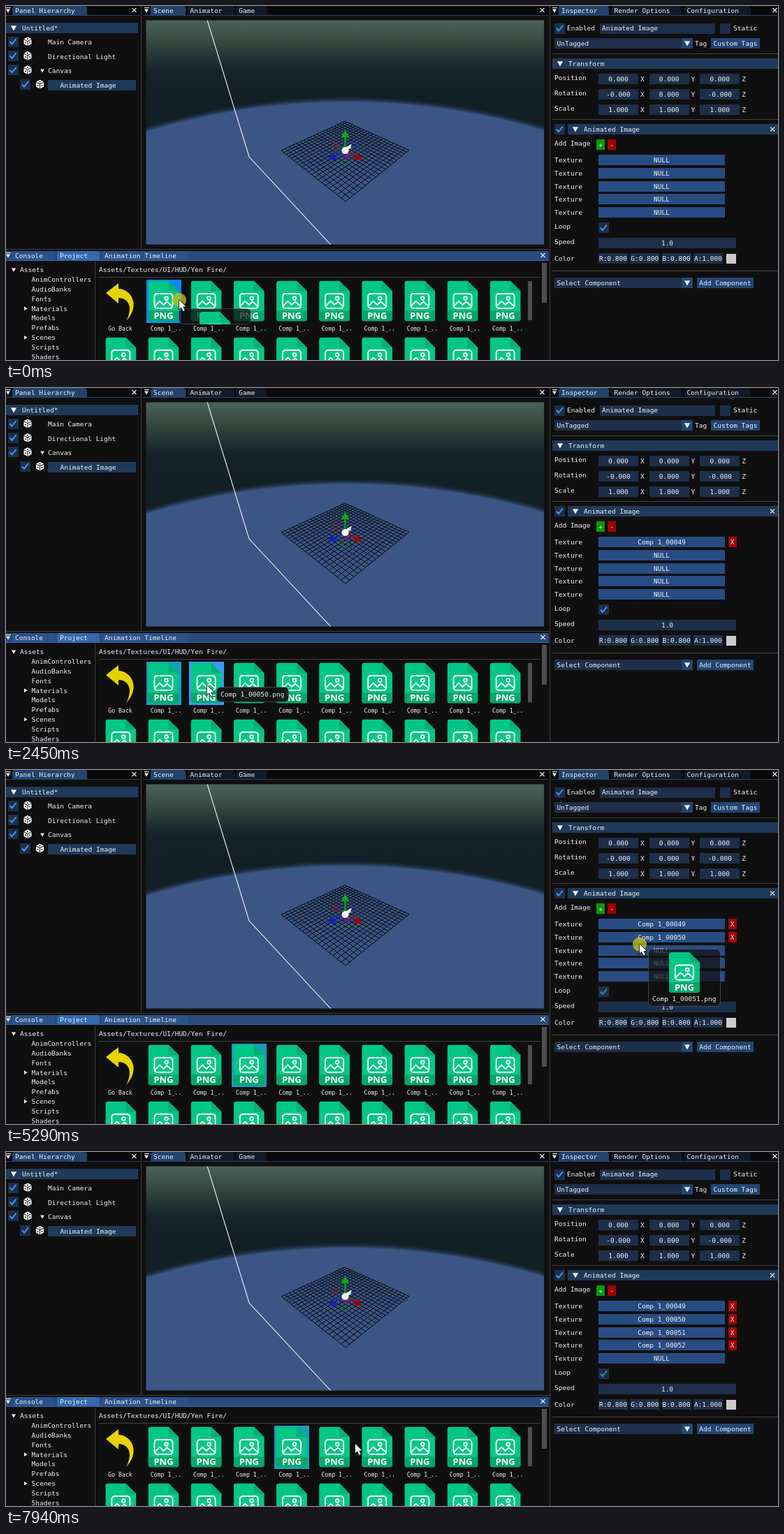
These frames come from a looping animation (1105 px wide and 507 px high, 8 s). An HTML page with a canvas:

```html
<!DOCTYPE html>
<html lang="en">
<head>
<meta charset="utf-8">
<title>Animated image editor</title>
<style>
html, body { margin: 0; width: 100%; height: 100%; overflow: hidden; background: #0f0f0f; }
canvas { display: block; }
</style>
</head>
<body>
<canvas id="stage" width="1105" height="507"></canvas>
<script>
const W = 1105, H = 507, LOOP = 8000, TICK = 80, LAG = 16, CHAR = 5.72;
const stage = document.getElementById('stage').getContext('2d');
let g = stage;

const C = {
  bg: '#0f0f0f', frame: '#1d2f49', button: '#234572', header: '#1f3a59', line: '#3e3e48',
  check: '#4296fa', slot: '#284c82', red: '#a00000', green: '#0a9a0a', text: '#f2f2f2',
  selected: '#189cbc', hover: '#4296fa', active: '#0f87fa'
};
const BAR = { bar: '#0a0a0a', tab: '#111a26', on: '#23436c' };
const FOCUSED_BAR = { bar: '#294a7a', tab: '#2b5288', on: '#3369ad' };

// ---------- drawing helpers ----------
function box(x, y, w, h, color) {
  g.fillStyle = color;
  g.fillRect(Math.round(x), Math.round(y), w, h);
}
function trace(points) {
  g.beginPath();
  points.forEach(([x, y]) => g.lineTo(x, y));
}
function poly(points, color) {
  trace(points);
  g.fillStyle = color;
  g.fill();
}
function stroke(points, color, width = 1) {
  trace(points);
  g.strokeStyle = color;
  g.lineWidth = width;
  g.stroke();
}
function dot(x, y, r, color) {
  g.beginPath();
  g.arc(x, y, r, 0, 7);
  g.fillStyle = color;
  g.fill();
}
function outline(x, y, w, h, color, width) {
  g.strokeStyle = color;
  g.lineWidth = width;
  g.strokeRect(x, y, w, h);
}
// y is the middle of the capital letters
function text(s, x, y, align = 'left', size = 9.5) {
  g.font = size + 'px "DejaVu Sans Mono", monospace';
  g.textAlign = align;
  g.fillStyle = C.text;
  g.fillText(s, x, y + size * 0.36);
}
function field(s, x, y, w, color = C.frame) {
  box(x, y - 7.5, w, 15, color);
  text(s, x + w / 2, y + 0.5, 'center');
}
// triangle of radius r; angle 0 points right
function arrow(x, y, r, angle, color) {
  const corner = k => [x + r * Math.cos(angle + k * 2.1), y + r * Math.sin(angle + k * 2.1)];
  poly([0, 1, 2].map(corner), color);
}
function down(x, y, r = 4.8) {
  arrow(x, y - 0.8, r, Math.PI / 2, C.text);
}
function cross(x, y) {
  for (const s of [-3, 3]) stroke([[x - 3, y - s], [x + 3, y + s]], C.text, 1.1);
}
function checkbox(x, y, color) {
  box(x, y - 7.5, 15, 15, C.frame);
  if (color) stroke([[x + 3, y], [x + 6, y + 3.5], [x + 12, y - 4]], color, 2);
}
function header(s, x, y, w) {
  box(x, y - 7.5, w, 15, C.header);
  down(x + 11, y);
  text(s, x + 23, y + 0.5);
}
function combo(s, y) {
  field('', 785, y, 183);
  field('', 967, y, 16, C.button);
  down(975, y);
  text(s, 788.5, y);
}
function cube(x, y) {
  poly([[x, y - 6], [x + 5.5, y - 3.2], [x, y - 0.6], [x - 5.5, y - 3.2]], '#fff');
  for (const s of [-1, 1]) {
    poly([[x + s * 5.5, y - 2.3], [x + s * 0.5, y + 0.3], [x + s * 0.5, y + 6.5],
      [x + s * 5.5, y + 3.8]], '#fff');
    dot(x + s * 3, y + 2, 1, C.bg);
  }
  dot(x, y - 3.2, 1, C.bg);
}
function fileIcon(x, y) {
  g.save();
  g.translate(x, y);
  g.beginPath();
  g.roundRect(0, 0, 44, 58, 4);
  g.clip();
  poly([[0, 0], [29, 0], [44, 15], [44, 58], [0, 58]], '#00c785');
  poly([[0, 43], [44, 43], [44, 58], [0, 58]], '#00a76c');
  poly([[29, 0], [44, 15], [29, 15]], '#00b076');
  g.beginPath();
  g.roundRect(9, 18.5, 26, 21, 4);
  g.moveTo(28.4, 25);
  g.arc(26, 25, 2.4, 0, 7);
  g.strokeStyle = '#fff';
  g.lineWidth = 1.8;
  g.stroke();
  stroke([[9, 37], [16.5, 29], [22, 34.5], [27, 30], [34.5, 36.5]], '#fff', 1.8);
  g.font = 'bold 13px "Open Sans", sans-serif';
  g.textAlign = 'center';
  g.fillStyle = '#fff';
  g.fillText('PNG', 22, 54.5);
  g.restore();
}

// ---------- still parts ----------
function tabs(x0, x1, y, names, on, colors) {
  box(x0, y - 6, x1 - x0, 13, colors.bar);
  box(x0, y + 7, x1 - x0, 1, colors.on);
  let x = x0 + 15;
  names.forEach((s, i) => {
    const w = s.length * CHAR;
    g.beginPath();
    g.roundRect(Math.round(x - 4), y - 6, Math.round(w + 21), 13, [4, 4, 0, 0]);
    g.fillStyle = i === on ? colors.on : colors.tab;
    g.fill();
    text(s, x, y + 0.5);
    x += w + 24;
  });
  box(x0 + 2, y - 4, 7, 1, C.text);
  down(x0 + 5, y + 1, 3.5);
  cross(x1 - 8.5, y);
}

function hierarchy() {
  tabs(-2, 192, 6, ['Panel Hierarchy'], 0, BAR);
  header('Untitled*', 0, 31.5, 189);
  box(60, 105.5, 126, 15, C.header);
  ['Main Camera', 'Directional Light', 'Canvas', 'Animated Image'].forEach((s, i) => {
    const y = 51 + i * 20.4, indent = i === 3 ? 17.5 : 0;
    checkbox(2.5 + indent, y, C.check);
    cube(31 + indent, y - 0.5);
    text(s, 60 + indent, y + 1);
  });
  down(52, 93, 3.3);
}

// maps the unit square onto four corners in perspective
function projector([[x0, y0], [x1, y1], [x2, y2], [x3, y3]]) {
  const sx = x0 - x1 + x2 - x3, sy = y0 - y1 + y2 - y3;
  const ax = x1 - x2, ay = y1 - y2, bx = x3 - x2, by = y3 - y2;
  const det = ax * by - bx * ay;
  const p = (sx * by - bx * sy) / det, q = (ax * sy - sx * ay) / det;
  return (u, v) => {
    const d = 1 + p * u + q * v;
    return [
      (x0 + (x1 - x0 + p * x1) * u + (x3 - x0 + q * x3) * v) / d,
      (y0 + (y1 - y0 + p * y1) * u + (y3 - y0 + q * y3) * v) / d
    ];
  };
}

function gizmo(x, y) {
  const axis = (angle, length, color) => {
    const dx = Math.cos(angle), dy = Math.sin(angle);
    stroke([[x, y], [x + dx * length, y + dy * length]], color, 2.2);
    arrow(x + dx * length, y + dy * length, 7, angle, color);
  };
  outline(x - 17, y - 11, 6, 7, '#a01018', 1);
  outline(x + 10, y - 11, 6, 7, '#1c2ca0', 1);
  stroke([[x - 7, y + 17], [x, y + 13], [x + 7, y + 17], [x, y + 22], [x - 7, y + 17]], '#0a8a30');
  poly([[x, y + 6], [x + 7, y + 9], [x + 2, y + 13], [x - 4, y + 9]], '#6a1a90');
  axis(-Math.PI / 2, 22, '#08a818');
  axis(0.5, 21, '#960a10');
  axis(Math.PI - 0.5, 21, '#1420b0');
  poly([[x + 2, y - 5], [x + 9, y - 9], [x + 8, y - 3], [x + 3, y]], '#e8e8e8');
  dot(x, y + 0.5, 5, '#fff');
}

function gradient(grad, ...stops) {
  stops.forEach(([at, color]) => grad.addColorStop(at, color));
  return grad;
}

function scene() {
  tabs(196, 776, 6, ['Scene', 'Animator', 'Game'], 0, BAR);
  g.save();
  g.beginPath();
  g.rect(200.5, 20.5, 569.5, 321);
  g.clip();
  box(200, 20, 571, 322, gradient(g.createLinearGradient(0, 20, 0, 130),
    [0, '#4a645a'], [0.3, '#32483f'], [0.65, '#16242a'], [1, '#121f25']));
  const r = 990, cx = 488, cy = 134 + r;
  dot(cx, cy, r + 5, gradient(g.createRadialGradient(cx, cy, r - 4, cx, cy, r + 5),
    [0, '#3b5685'], [1, 'rgba(24,40,54,0)']));

  const at = projector([[485, 165], [577, 206.5], [486, 280], [394, 207]]);
  for (let i = 0; i <= 20; i++) {
    const k = i / 20;
    stroke([at(k, 0), at(k, 1)], '#05080d');
    stroke([at(0, k), at(1, k)], '#05080d');
  }
  stroke([[288, 20], [348, 216], [465, 342]], '#f0f2f5', 1.1);
  gizmo(485.5, 206.5);
  g.restore();
}

const rowY = i => Math.round(220 + i * 18.75) + 0.5;

function inspector() {
  tabs(780, 1109, 6, ['Inspector', 'Render Options', 'Configuration'], 0, BAR);
  checkbox(785, 32, C.check);
  text('Enabled', 803, 32);
  field('', 850, 32, 165);
  text('Animated Image', 853, 32);
  checkbox(1022, 32);
  text('Static', 1041, 32);
  combo('UnTagged', 53.5);
  text('Tag', 986, 54);
  field('Custom Tags', 1009, 53.5, 70, C.button);

  for (const y of [68, 162, 379]) box(782, y, 323, 1, C.line);
  header('Transform', 782, 82.5, 323);
  ['Position', 'Rotation', 'Scale'].forEach((s, row) => {
    const y = 104 + row * 22;
    text(s, 785, y - 1.5);
    for (let i = 0; i < 3; i++) {
      const x = 848 + i * 72.6, sign = row === 1 && i !== 1 ? '-' : '';
      field(sign + (row === 2 ? '1.000' : '0.000'), x, y, 57);
      text('XYZ'[i], x + 60, y + 0.5);
    }
  });

  checkbox(785, 176.5, C.check);
  header('Animated Image', 804, 176.5, 301);
  cross(1097, 176.5);
  text('Add Image', 785, 197);
  field('+', 845, 198.5, 12, C.green);
  field('-', 861, 198.5, 12, C.red);
  for (let i = 0; i < 5; i++) text('Texture', 785, rowY(i));
  text('Loop', 785, 316);
  text('Speed', 785, 338);
  field('1.0', 848, 339.5, 197);
  text('Color', 785, 361.5);
  ['R:0.800', 'G:0.800', 'B:0.800', 'A:1.000'].forEach((s, i) => field(s, 848 + i * 45.3, 361.5, 42));
  box(1031, 354.5, 14, 14, '#cccccc');
  combo('Select Component', 396.5);
  field('Add Component', 989, 396.5, 81, C.button);
}

function backArrow() {
  g.beginPath();
  g.moveTo(143, 411);
  g.lineTo(161, 397);
  g.lineTo(161, 405);
  g.bezierCurveTo(178, 405, 194, 428, 172, 451);
  g.bezierCurveTo(182, 433, 176, 418, 161, 418);
  g.lineTo(161, 426);
  g.fillStyle = '#e6d200';
  g.fill();
}

const tileX = i => 201 + i * 61.15;

function project() {
  tabs(-2, 777, 357, ['Console', 'Project', 'Animation Timeline'], 1, FOCUSED_BAR);
  box(127, 366, 1, 141, C.line);
  down(11, 378, 3.6);
  text('Assets', 20, 377.5);
  const folders = ['AnimControllers', 'AudioBanks', 'Fonts', 'Materials', 'Models',
    'Prefabs', 'Scenes', 'Scripts', 'Shaders'];
  folders.forEach((s, i) => {
    const y = 391.5 + i * 13.88;
    if (s === 'Materials' || s === 'Scenes') arrow(27.5, y, 3.2, 0, C.text);
    text(s, 36.5, y);
  });
  text('Assets/Textures/UI/HUD/Yen Fire/', 133, 377.5);
  box(133, 388, 632, 1, C.line);
  box(767, 368, 7, 57, '#4f4f4f');
  box(747, 394, 6, 56, '#4f4f4f');
  backArrow();
  text('Go Back', 163.5, 462, 'center', 8.2);
  for (let i = 0; i < 9; i++) text('Comp 1_..', tileX(i) + 28, 462, 'center', 8.2);
  for (let i = -1; i < 9; i++) fileIcon(tileX(i) + 2.5, 474.5);
}

const backdrop = document.createElement('canvas');
backdrop.width = W;
backdrop.height = H;
g = backdrop.getContext('2d');
box(0, 0, W, H, C.bg);
hierarchy();
scene();
inspector();
project();
box(193, 0, 1, 348, C.line);
box(778, 0, 1, H, C.line);
box(0, 348, 778, 1, C.line);
g = stage;

// ---------- motion ----------
// pointer trips: leave, arrive, x, y
const trips = [[0, 1190, 882, 222], [1500, 2350, 288, 426], [2480, 3080, 878, 256],
  [3120, 3250, 882, 241], [3400, 4450, 341, 427], [4480, 5100, 888, 232], [5100, 5400, 915, 257],
  [5650, 6530, 374, 432], [6540, 6640, 405, 425], [6650, 7290, 915, 277], [7380, 7900, 500, 418]];
const easeOut = k => 1 - (1 - k) ** 1.6;

function pointer(t) {
  let x = 248, y = 421;
  trips.forEach(([leave, arrive, toX, toY], i) => {
    if (i && t < leave) return;
    const k = easeOut(Math.min(1, (t - leave) / (arrive - leave)));
    x += (toX - x) * k;
    y += (toY - y) * k;
  });
  return [x, y];
}

// one entry per file: press, release, drop
const drags = [[-100, 1340, 1540], [2480, 3290, 3360], [4480, 5530, 5650], [6650, 7340, 7380]];
const fileName = i => 'Comp 1_000' + (49 + i);

function panel(x, y, h, alpha) {
  g.beginPath();
  g.roundRect(x + 0.5, y + 0.5, 103, h - 1, 6);
  g.fillStyle = `rgba(17,17,18,${alpha})`;
  g.fill();
  g.strokeStyle = 'rgba(110,110,128,.5)';
  g.lineWidth = 1;
  g.stroke();
}

function payload(i, x, y, opening) {
  const h = opening ? 23 : 83;
  panel(x, y, h, 0.72);
  g.save();
  g.beginPath();
  g.rect(x, y, 104, h);
  g.clip();
  fileIcon(x + 30, y + 5);
  text(fileName(i) + '.png', x + 6, y + 72);
  g.restore();
}

function nameTip(i, x, y) {
  panel(x, y, 22, 0.94);
  text(fileName(i) + '.png', x + 6, y + 11);
}

function dropTargets(x, y) {
  const yellow = '#f5f50a';
  if (x > 200 && x < 770 && y > 20 && y < 342) outline(198, 18, 574, 326, yellow, 2);
  if (x < 848 || x > 1029) return;
  for (let i = 0; i < 5; i++) {
    if (Math.abs(y - rowY(i)) < 7.7) outline(846, rowY(i) - 10.5, 186, 21, yellow, 2);
  }
}

function cursor(x, y) {
  g.save();
  g.translate(x, y);
  const shape = [[0, 0], [0, 13], [3, 10.4], [5.4, 16], [7.8, 15], [5.4, 9.6], [9.4, 9.4], [0, 0]];
  stroke(shape, '#101010', 1.6);
  poly(shape, '#fff');
  g.restore();
}

function draw(t) {
  const [x, y] = pointer(t), [lagX, lagY] = pointer(t - LAG).map(Math.round);
  const held = drags.findIndex(([press, , drop]) => t >= press && t < drop);
  const picked = drags.filter(([press]) => t >= press).length - 1;
  const isOver = i => x >= tileX(i) && x <= tileX(i) + 53 && y > 391 && y < 453;

  g.drawImage(backdrop, 0, 0);
  let over = -1;
  for (let i = 0; i < 9; i++) {
    let color = i === picked ? C.selected : null;
    if (isOver(i)) {
      over = i;
      if (held < 0) color = C.hover;
      else if (i === held) color = C.active;
    }
    if (color) box(tileX(i) - 0.5, 391.5, 50, 62, color);
    fileIcon(tileX(i) + 2.5, 393.5);
  }

  for (let i = 0; i < 5; i++) {
    const filled = i < drags.length && t >= drags[i][2];
    field(filled ? fileName(i) : 'NULL', 848, rowY(i), 181, C.slot);
    if (filled) field('X', 1033.5, rowY(i), 12, C.red);
  }
  checkbox(848, 317.5, t < drags[1][0] ? C.check : '#3b8a9c');

  if (held >= 0) {
    dropTargets(x, y);
    if (t < drags[held][1]) dot(x, y, 10, 'rgba(190,195,30,.78)');
    payload(held, lagX + 13, lagY + 8, t < 60);
  } else if (over >= 0) {
    nameTip(over, lagX + 13, lagY + 2);
  }
  cursor(x, y);
}

const tickTime = t => Math.max(0, Math.floor((t - 45) / TICK) * TICK + 60);

function frame(now) {
  draw(tickTime(now % LOOP));
  requestAnimationFrame(frame);
}
draw(0);
requestAnimationFrame(frame);
</script>
</body>
</html>
```
